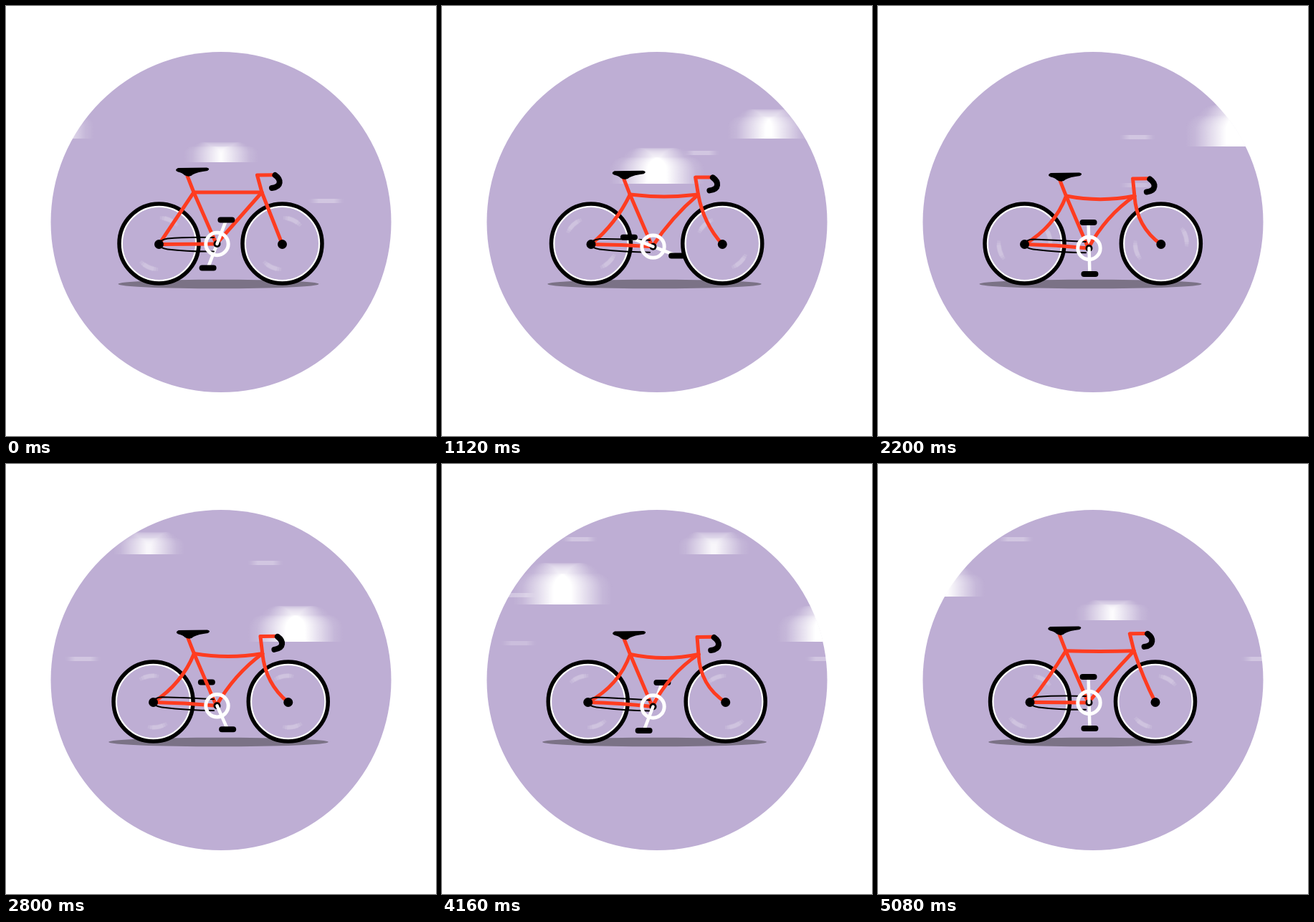
Write an HTML page with a canvas that moves like this. It is 600 px wide and 600 px high and loops after 5120 ms.

```html
<!DOCTYPE html>
<html lang="en">
<head>
<meta charset="utf-8">
<title>Bouncing bicycle</title>
<style>
  html, body { margin: 0; width: 100%; height: 100%; overflow: hidden; background: #fff; }
  canvas { display: block; width: 100vmin; height: 100vmin; }
</style>
</head>
<body>
<canvas id="stage" width="600" height="600"></canvas>
<script>
const ctx = document.getElementById('stage').getContext('2d');
const STEP = 40, FRAMES = 128, BOUNCE = 16;
const RED = '#ff3c20', BLACK = '#000', WHITE = '#fff', SKY = '#beaed4', SHADE = '#7b7286';
const TAU = Math.PI * 2, DEG = Math.PI / 180;

// Sky traffic: each pass repeats the same clouds and two groups of streaks.
const PASSES = [2, 48, 87];
const CLOUDS = [
  { at: 13,   speed: 33, bottom: 196, w: 82, h: 58, step: 14, blur: 58 },
  { at: 19.2, speed: 36, bottom: 126, w: 48, h: 31, step: 8,  blur: 54 },
  { at: 26,   speed: 26, bottom: 248, w: 80, h: 50, step: 13, blur: 54 },
  { at: 32,   speed: 26, bottom: 185, w: 62, h: 41, step: 10, blur: 54 },
  { at: 41,   speed: 27, bottom: 218, w: 52, h: 28, step: 6,  blur: 54 }
];
const GROUPS = [13, 36];
const STREAKS = [[105, 0, 0.3], [272, 4, 0.3], [138, 7, 0.3], [205, 11, 0.3], [183, 15, 0.3], [250, 15, 0.2]];

const mod = (a, b) => ((a % b) + b) % b;

function fadeBar(c, cx, y, width, blur, height, alpha) {
  const half = (width + blur) / 2;
  const ramp = Math.min(width, blur) / (width + blur);
  const peak = alpha * Math.min(1, width / blur);
  const g = c.createLinearGradient(cx - half, 0, cx + half, 0);
  const stop = (p, a) => g.addColorStop(p, `rgba(255,255,255,${a})`);
  stop(0, 0);
  stop(ramp * 0.25, peak * 0.13);
  stop(ramp, peak);
  stop(1 - ramp, peak);
  stop(1 - ramp * 0.25, peak * 0.13);
  stop(1, 0);
  c.fillStyle = g;
  c.fillRect(cx - half, y, half * 2, height);
}

// Width of a cap of radius r at depth y below its top.
const chord = (r, y) => 2 * Math.sqrt(Math.max(0, r * r - (r - Math.min(y, r)) ** 2));

function makeCloud({ w, h, step, blur }) {
  const img = document.createElement('canvas');
  img.width = 200;
  img.height = h;
  const c = img.getContext('2d');
  const r = (h - step) / 2;
  for (let y = 0; y < h; y++) {
    const lobe = chord(w * 0.32, y + 0.5);
    const body = y < step ? 0 : w - 2 * r + chord(r, y - step + 0.5);
    fadeBar(c, 100, y, Math.max(lobe, body, 1), blur, 1, 1);
  }
  return img;
}
CLOUDS.forEach(c => { c.img = makeCloud(c); });

function disc(x, y, r, color) {
  ctx.fillStyle = color;
  ctx.beginPath();
  ctx.arc(x, y, r, 0, TAU);
  ctx.fill();
}

function ring(x, y, r, width, color) {
  ctx.strokeStyle = color;
  ctx.lineWidth = width;
  ctx.beginPath();
  ctx.arc(x, y, r, 0, TAU);
  ctx.stroke();
}

function line(points, color, width) {
  ctx.strokeStyle = color;
  ctx.lineWidth = width;
  ctx.beginPath();
  points.forEach(([x, y]) => ctx.lineTo(x, y));
  ctx.stroke();
}

// Tube between two joints; its control point leaves the middle by (bx, by).
function tube([x0, y0], [x1, y1], bx, by) {
  ctx.strokeStyle = RED;
  ctx.lineWidth = 5;
  ctx.beginPath();
  ctx.moveTo(x0, y0);
  ctx.quadraticCurveTo((x0 + x1) / 2 + bx, (y0 + y1) / 2 + by, x1, y1);
  ctx.stroke();
}

function drawSky(n) {
  disc(300, 301.5, 237.5, SKY);
  ctx.save();
  ctx.beginPath();
  ctx.arc(300, 301.5, 238, 0, TAU);
  ctx.clip();
  for (const start of PASSES) {
    for (const g of GROUPS) {
      for (const [y, delay, alpha] of STREAKS) {
        const age = mod(n - start - g - delay, FRAMES);
        if (age < 7) fadeBar(ctx, 532 - 85 * age, y - 3, 36, 15, 6, alpha);
      }
    }
    for (const c of CLOUDS) {
      const age = mod(n - start - c.at + FRAMES / 2, FRAMES) - FRAMES / 2;
      const x = 300 - age * c.speed;
      if (x > -100 && x < 700) ctx.drawImage(c.img, x - 100, c.bottom - c.h);
    }
  }
  ctx.restore();
}

function drawWheel(x, spin) {
  const y = 331.5;
  ring(x, y, 52, 3, WHITE);
  ring(x, y, 55.5, 5.5, BLACK);
  ctx.lineCap = 'butt';
  ctx.strokeStyle = 'rgba(255,255,255,0.1)';
  for (let side = 0; side < 2; side++) {
    const mid = (spin - 90 + side * 180) * DEG;
    [24, 34, 44].forEach((span, i) => {
      ctx.lineWidth = 7 - i;
      ctx.beginPath();
      ctx.arc(x, y, 36, mid - span / 2 * DEG, mid + span / 2 * DEG);
      ctx.stroke();
    });
  }
  ctx.lineCap = 'round';
}

function drawCrank(x, y, angle) {
  const px = x + 36 * Math.sin(angle), py = y - 36 * Math.cos(angle);
  line([[x, y], [px, py]], WHITE, 4.5);
  line([[px - 8, py], [px + 8, py]], BLACK, 8);
}

function drawChain(rx, by, s) {
  ctx.strokeStyle = BLACK;
  ctx.lineWidth = 2;
  ctx.beginPath();
  ctx.moveTo(290, by - 9);
  ctx.quadraticCurveTo(250, 322 + 5 * s, rx + 12, 324.5 + s);
  ctx.quadraticCurveTo(rx + 1, 326, rx + 1, 332);
  ctx.quadraticCurveTo(rx + 1, 338, rx + 12, 339.5);
  ctx.quadraticCurveTo(255, 343 + s, 290, 342.5 + 2 * s);
  ctx.stroke();
}

function drawSaddle(s) {
  ctx.save();
  ctx.translate(s, 7.5 * s);
  ctx.fillStyle = BLACK;
  ctx.fill(new Path2D('M240 226 L280 225.5 Q286 227 281 230 Q267 231.5 261 235 Q256 240 249 236 Q246 232.5 240 231.5 Q234 229 240 226 Z'));
  ctx.restore();
}

function drawBars(s) {
  ctx.save();
  ctx.translate(4.2 * s, 6 * s);
  ctx.strokeStyle = BLACK;
  ctx.lineWidth = 8;
  ctx.stroke(new Path2D('M375.5 236 C384 242 385 252 371 254'));
  ctx.restore();
}

function drawBike(n) {
  const k = n % BOUNCE;
  const s = 1 - Math.pow(Math.abs(k - 8) / 8, 1.2);
  const rx = 213.5 - 9.8 * s, fx = 385.5 + 10.2 * s;
  const bx = 294.5, by = 332 + 6.5 * s;
  const crank = (21 + 22.5 * k) * DEG;
  const spin = 24 + 84.375 * k;
  const rear = [rx, 332.5], front = [fx, 332.5], bottom = [bx - 1, by];
  const seat = [262 + 0.5 * s, 260 + 5.5 * s], head = [357 + s, 260 + 5.5 * s];
  const stem = [350.5 + 5.5 * s, 236 + 5.5 * s];

  ctx.lineCap = ctx.lineJoin = 'round';
  ctx.fillStyle = SHADE;
  ctx.beginPath();
  ctx.ellipse(296.5, 388, 140 + 16.5 * s, 6.3, 0, 0, TAU);
  ctx.fill();

  drawWheel(rx, spin);
  drawWheel(fx, spin);
  drawCrank(bx, by, crank + Math.PI);

  tube(rear, bottom, 0, -2 * s);
  tube(seat, rear, 14 * s, 10 * s);
  tube(head, bottom, -9 * s, -9 * s);
  tube(head, front, -17 * s, 10 * s);
  tube(seat, head, 0, 10 * s);
  line([[253 + s, 237 + 7 * s], seat, bottom], RED, 5);
  line([head, stem, [374 + 4 * s, 235.8 + 5.5 * s]], RED, 5);
  drawSaddle(s);
  drawBars(s);
  drawChain(rx, by, s);
  disc(rx, 332.5, 6.5, BLACK);
  disc(fx, 332.5, 6.5, BLACK);

  ring(bx, by, 15.7, 5, WHITE);
  disc(bx, by, 5, BLACK);
  drawCrank(bx, by, crank);
}

function frame() {
  const n = Math.floor(performance.now() / STEP) % FRAMES;
  ctx.fillStyle = WHITE;
  ctx.fillRect(0, 0, 600, 600);
  drawSky(n);
  drawBike(n);
  requestAnimationFrame(frame);
}
frame();
</script>
</body>
</html>
```
